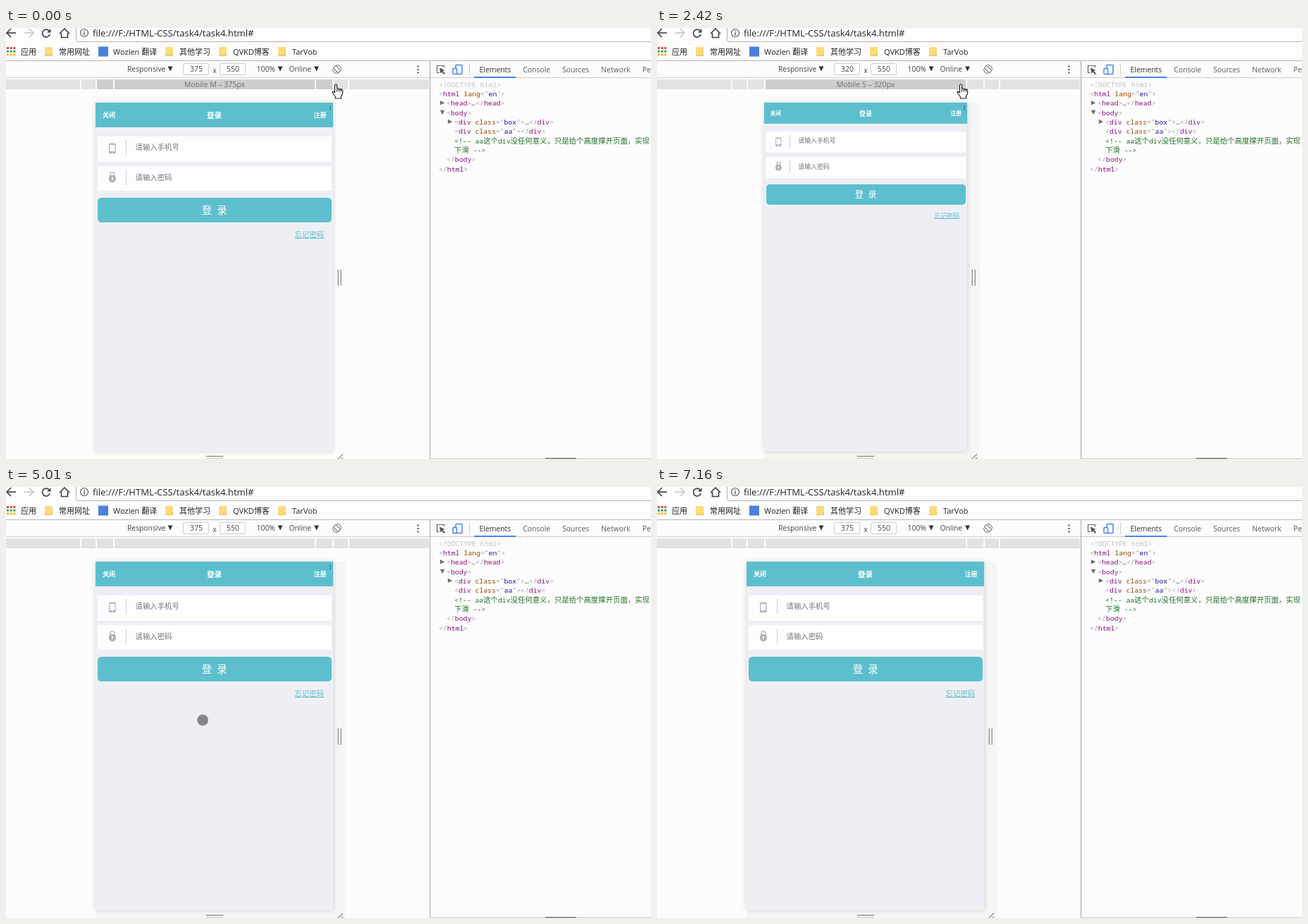
Write an HTML page with a canvas that moves like this. It is 915 by 612 pixels and loops after 7.72 s.

```html
<!DOCTYPE html>
<html lang="zh">
<head>
<meta charset="utf-8">
<title>Responsive login page</title>
<style>
html, body { margin: 0; width: 100%; height: 100%; overflow: hidden; background: #fcfcfc; }
canvas { display: block; }
</style>
</head>
<body>
<canvas id="stage" width="915" height="612"></canvas>
<script>
const ctx = document.getElementById('stage').getContext('2d');
const LOOP = 7720, STEP = 151, TOP = 106, PAGE_ZOOM = 0.9, DRAG = 151, EXIT = 6400;
const UI = '"Open Sans", "Noto Sans CJK SC", "Noto Sans CJK", sans-serif';
const CJK = '"Noto Sans CJK SC", "Noto Sans CJK", sans-serif';
const MONO = '"Noto Sans Mono", "Noto Sans CJK SC", monospace';
const TEAL = '#5dbfce', GREY = '#b0b0b0', PAPER = '#fcfcfc';
const PRESETS = [[320, 'Mobile S'], [375, 'Mobile M'], [425, 'Mobile L'], [768, 'Tablet'], [1024, 'Laptop']];

// ---- motion ----

function ramp(t, a, b) {
  const p = Math.min(1, Math.max(0, (t - a) / (b - a)));
  return p * p * (3 - 2 * p);
}

// Clicks on the preset bar
const widthAt = t => t < 540 ? 375 : t < 1360 ? 425 : t < 2300 ? 768 : t < 2720 ? 320 : 375;

// Two swipes up and back down; 1 is fully scrolled
const scrollAt = t => ramp(t, 3360, 3780) - ramp(t, 4440, 4980) + ramp(t, 5010, 5500) - ramp(t, 5800, 6030);

function pointerAt(t) {
  const lift = scrollAt(t) - ramp(t, 3780, 3900) + ramp(t, 4040, 4290);
  const x = 468 + 6 * ramp(t, 0, 260) + 29 * ramp(t, 540, 950) - 54 * ramp(t, 1100, 1350)
    - 44 * ramp(t, 1360, 2000) + 26 * ramp(t, 2270, 2410) + 18 * ramp(t, 2416, 2560)
    - 173 * ramp(t, 2720, 3200) + 6 * ramp(t, 3900, 6030) + 508 * ramp(t, EXIT, 7050);
  const y = 80 + 4 * Math.max(0, 1 - Math.abs(t - 1360) / 200) + 254 * ramp(t, 2720, 3200)
    - DRAG * lift - 3 * ramp(t, 4400, 4900) + 306 * ramp(t, EXIT, 7050);
  return [x, y];
}

// ---- drawing helpers ----

function rect(x, y, w, h, color) {
  ctx.fillStyle = color;
  ctx.fillRect(x, y, w, h);
}

function paint(fill, stroke) {
  if (fill) { ctx.fillStyle = fill; ctx.fill(); }
  if (stroke) { ctx.strokeStyle = stroke; ctx.stroke(); }
}

function box(x, y, w, h, r, fill, stroke) {
  ctx.beginPath();
  ctx.roundRect(x, y, w, h, r);
  paint(fill, stroke);
}

function poly(points, fill, stroke) {
  ctx.beginPath();
  points.forEach(([x, y]) => ctx.lineTo(x, y));
  if (fill) ctx.closePath();
  paint(fill, stroke);
}

function arc(x, y, r, fill, stroke, from = 0, to = Math.PI * 2) {
  ctx.beginPath();
  ctx.arc(x, y, r, from, to);
  paint(fill, stroke);
}

// y is the optical middle of the line; returns the right end
function text(s, x, y, size, color, align = 'left', font = UI, weight = 400) {
  ctx.font = `${weight} ${size}px ${font}`;
  ctx.textAlign = align;
  ctx.fillStyle = color;
  ctx.fillText(s, x, y + size * 0.37);
  return x + ctx.measureText(s).width;
}

// Triangle pointing right, or down when turned
function caret(x, y, size, color, turn) {
  ctx.save();
  ctx.translate(x, y);
  if (turn) ctx.rotate(Math.PI / 2);
  poly([[-size, -size], [size, 0], [-size, size]], color);
  ctx.restore();
}

// ---- browser window ----

function folder(x) {
  box(x, 27, 11, 13, 1, '#fbdc7c');
  rect(x, 38.5, 11, 1.5, '#eec75d');
  rect(x + 9, 35, 2, 5, '#f0cb63');
}

function browserBar() {
  rect(0, 0, 915, 46, '#fdfdfd');
  ctx.lineWidth = 1.7;
  for (const [x, dir, c] of [[1, 1, '#444'], [39, -1, '#c8c8c8']]) {
    poly([[x, 7], [x + 13 * dir, 7]], null, c);
    poly([[x + 6 * dir, 1], [x, 7], [x + 6 * dir, 13]], null, c);
  }
  arc(57, 7.5, 5.4, null, '#444', 0.3, 5.5);
  poly([[63.5, 1], [63.5, 6.5], [58, 6.5]], '#444');
  poly([[76, 8], [83, 1], [90, 8]], null, '#444');
  poly([[78.5, 7], [78.5, 13.5], [87.5, 13.5], [87.5, 7]], null, '#444');
  ctx.lineWidth = 1;
  poly([[99.5, 0], [99.5, 17], [101, 19.5], [915, 19.5]], null, '#b4b4b4');
  ctx.lineWidth = 1.2;
  arc(111, 7, 5.5, null, '#555');
  rect(110.3, 6, 1.4, 4.5, '#555');
  rect(110.3, 3.6, 1.4, 1.4, '#555');
  text('file:///F:/HTML-CSS/task4/task4.html#', 123, 7, 13.1, '#222');

  const hues = ['#e2493b', '#3f9d57', '#f0b72f'];
  for (let i = 0; i < 9; i++) rect(1 + (i % 3) * 4.7, 27 + Math.floor(i / 3) * 4.7, 3, 3, hues[Math.floor(i / 3)]);
  let x = text('应用', 21, 33.5, 11, '#222') + 12;
  ['常用网址', 'Wozlen 翻译', '其他学习', 'QVKD博客', 'TarVob'].forEach((name, i) => {
    if (i === 1) rect(x, 26.5, 14, 14, '#4a80dc');
    else folder(Math.round(x));
    x = text(name, Math.round(x) + (i === 1 ? 21 : 20), 33.5, 11, '#222') + 12;
  });
  rect(0, 46, 915, 1, '#b6b6b6');
}

function deviceToolbar(width, zoom) {
  const dx = zoom < 1 ? -6 : 0;
  text('Responsive', 172, 58.5, 10.3, '#444');
  text('x', 296, 60, 10.5, '#444', 'center');
  text(Math.round(zoom * 100) + '%', 355.5, 58.5, 10.4, '#444');
  text('Online', 401.5 + dx, 58.5, 10.3, '#444');
  for (const x of [233, 389 + dx, 440.5 + dx]) caret(x, 58, 3.4, '#333', true);
  ctx.lineWidth = 1;
  for (const [x, s] of [[251.5, width], [303.5, 550]]) {
    box(x, 50.5, 36, 16, 1, '#fff', '#cdcdcd');
    text(s, x + 18.5, 58.5, 10.4, '#444', 'center');
  }
  ctx.save();
  ctx.translate(469.5 + dx, 58.5);
  ctx.rotate(-Math.PI / 4);
  box(-2.5, -5, 5, 10, 1, null, '#666');
  arc(0, 0, 6, null, '#777', -0.9, 0.9);
  arc(0, 0, 6, null, '#777', 2.2, 4);
  ctx.restore();
  for (const d of [-4.5, 0, 4.5]) arc(584.5, 59 + d, 1.3, '#666');
  rect(0, 70, 601, 1, '#d2d2d2');
}

function presetBar(scale, px, py) {
  const mid = 296, edge = w => mid + w * scale / 2;
  rect(0, 73, 600, 14, '#e2e2e2');
  const hit = py < 83 && PRESETS.find(([w]) => edge(w) > px - 4);
  if (hit) {
    const right = Math.min(600, edge(hit[0]) - 1), left = Math.max(0, 2 * mid - right);
    rect(left, 73, right - left, 14, '#cdcdcd');
  }
  for (const [w] of PRESETS) {
    rect(Math.round(2 * mid - edge(w)), 73, 2, 14, '#fbfbfb');
    if (edge(w) < 600) rect(Math.round(edge(w)) - 2, 73, 2, 14, '#fbfbfb');
  }
  if (hit) text(`${hit[1]} – ${hit[0]}px`, mid, 80, 10.5, '#707070', 'center');
}

// ---- inspector ----

function code(s, x, y) {
  let prev = '';
  for (const tok of s.match(/<\/?|>|="|"|…|[a-z]+|\s+/g)) {
    let color = '#a894a6';
    if (tok === '…') color = '#444';
    else if (/[a-z]/.test(tok)) color = prev[0] === '<' ? '#881280' : prev === '="' ? '#1a1aa6' : '#994500';
    x = text(tok, x, y, 9.8, color, 'left', MONO);
    prev = tok;
  }
}

function comment(s, x, y) {
  for (const part of s.match(/[ -~]+|[^ -~]+/g)) {
    const wide = part.charCodeAt(0) > 255;
    x = text(part, x, y, wide ? 10.4 : 9.8, '#236e25', 'left', wide ? CJK : MONO);
  }
}

const SOURCE = `<!DOCTYPE html>
<html lang="en">
 <head>…</head>
 <body>
  <div class="box">…</div>
  <div class="aa"></div>
  <!-- aa这个div没任何意义，只是给个高度撑开页面，实现
  下滑 -->
 </body>
</html>`.split('\n');

function inspector() {
  rect(601, 47, 314, 565, PAPER);
  rect(601, 47, 1, 565, '#a8a8a8');
  ctx.lineWidth = 1.2;
  poly([[621.5, 56], [621.5, 53.5], [611.5, 53.5], [611.5, 63.5], [615, 63.5]], null, '#666');
  poly([[615, 56.5], [622.5, 60], [619.5, 61], [623, 64.5], [621.5, 66], [618, 62.5], [616.5, 65]], '#555');
  ctx.lineWidth = 1.5;
  box(638, 52.5, 9, 13, 1, null, '#4285f4');
  box(634, 57.5, 5.5, 8, 1, PAPER, '#4285f4');
  rect(657, 51, 1, 16, '#ccc');
  let tab = 671.5;
  for (const name of ['Elements', 'Console', 'Sources', 'Network', 'Performance']) {
    tab = text(name, tab, 59, 10.4, name === 'Elements' ? '#333' : '#5a5a5a') + 17;
  }
  rect(602, 70, 313, 1, '#ccc');
  rect(664, 69, 59, 2, '#4285f4');

  SOURCE.forEach((line, i) => {
    const s = line.trim(), x = 614 + 11 * (line.length - s.length), y = 80 + i * 13.35;
    if (s.startsWith('<!D')) text(s, x, y, 9.8, '#c0c0c0', 'left', MONO);
    else if (s.includes('--')) comment(s, x, y);
    else code(s, x, y);
    if (s.includes('…')) caret(x - 6, y - 0.5, 3.2, '#6e6e6e');
    if (s === '<body>') caret(x - 6, y, 3.2, '#6e6e6e', true);
  });
  rect(602, 611, 313, 1, '#ccc');
  rect(765, 610.5, 44, 1.5, '#777');
}

// ---- emulated page, laid out on a 337 px wide screen ----

function loginPage(x0, w, scroll, thumb) {
  const u = w / 337;
  const X = x => x0 + x * u, Y = y => TOP + y * u;
  const label = (s, x, y, size, color, align, weight) => text(s, X(x), Y(y), size * u, color, align, CJK, weight);
  const block = (x, y, bw, bh, color, r = 0) => {
    const l = Math.round(X(x)), t = Math.round(Y(y));
    box(l, t, Math.round(X(x + bw)) - l, Math.round(Y(y + bh)) - t, r * u, color);
  };

  ctx.save();
  ctx.translate(0, -scroll);
  ['请输入手机号', '请输入密码'].forEach((hint, i) => {
    const mid = 63.3 + i * 42.8;
    block(3, mid - 15.8, 332, 36 - i, '#fdfdfd');
    rect(Math.round(X(42.6)), Y(mid - 10.5), 1, 21.6 * u, '#cfcfcf');
    label(hint, 56.5, mid, 10.4, '#757575');
  });
  box(X(19), Y(57.8), 9.6 * u, 14.4 * u, 1.5 * u, GREY);
  rect(X(20.2), Y(59.8), 7.2 * u, 9.4 * u, '#fdfdfd');
  arc(X(23.8), Y(70.7), 0.8 * u, '#fdfdfd');
  ctx.lineWidth = 1.3 * u;
  ctx.beginPath();
  ctx.moveTo(X(21), Y(106));
  ctx.arc(X(23.9), Y(101.8), 2.9 * u, Math.PI, 0);
  ctx.lineTo(X(26.8), Y(106));
  paint(null, GREY);
  arc(X(23.9), Y(108), 5.2 * u, GREY);
  arc(X(23.9), Y(107), 1.3 * u, '#fdfdfd');
  rect(X(23.4), Y(107.2), u, 3.6 * u, '#fdfdfd');

  block(3, 135.4, 331.5, 34.4, TEAL, 5.5);
  label('登', 158, 152.7, 14.5, '#fff', 'center');
  label('录', 179.6, 152.7, 14.5, '#fff', 'center');
  label('忘记密码', 282.6, 187.5, 10.4, TEAL);
  rect(X(282.6), Math.round(Y(192)), 41.6 * u, Math.max(1, 0.9 * u), TEAL);
  ctx.restore();

  block(0, 0, 337, 35, TEAL);
  const weight = u > 1.4 ? 400 : 700;
  label('关闭', 9.9, 17.9, 9, '#fff', 'left', weight);
  label('登录', 168.6, 17.9, 10.6, '#fff', 'center', weight);
  label('注册', 327.6, 17.9, 9, '#fff', 'right', weight);
  if (thumb) rect(x0 + w - 5, TOP + 4, 2, u > 1.4 ? 2 : 7, 'rgba(40,90,100,.45)');
}

function device(width, scale, scroll, t) {
  const w = Math.floor(width * scale), h = Math.round(550 * scale);
  const x = Math.round(295.5 - w / 2), right = x + w, bottom = TOP + h;
  if (t >= 540) {
    rect(right, TOP, 18, h + 17, '#f5f5f5');
    rect(x, bottom, w, 17, '#f5f5f5');
  }
  ctx.save();
  ctx.shadowColor = 'rgba(0,0,0,.16)';
  ctx.shadowBlur = 7;
  rect(x, TOP, w, h, '#eeeff4');
  ctx.restore();
  ctx.save();
  ctx.beginPath();
  ctx.rect(x, TOP, w, h);
  ctx.clip();
  loginPage(x, w, scroll, t < EXIT);
  ctx.restore();

  const mid = Math.round(TOP + h / 2);
  for (const d of [7, 11]) {
    rect(right + d - 0.5, mid - 11, 1.5, 23, '#999');
    rect(284, bottom + d - 0.5, 24, 1.5, '#999');
  }
  ctx.lineWidth = 1.4;
  for (const d of [4, 9]) poly([[right + d, bottom + 14], [right + 14, bottom + d]], null, '#999');
  return px => px > x && px < right;
}

// ---- pointers ----

function hand(x, y) {
  ctx.save();
  ctx.translate(x, y);
  ctx.lineWidth = 1.2;
  ctx.lineJoin = 'round';
  ctx.beginPath();
  ctx.moveTo(-1.5, 12);
  ctx.lineTo(-1.5, 1);
  ctx.quadraticCurveTo(0, -1.5, 1.5, 1);
  ctx.lineTo(1.5, 6);
  for (const k of [4.5, 7.2, 9.5]) ctx.quadraticCurveTo(k - 1, 4.5 + k * 0.15, k, 7 + k * 0.1);
  [[9.5, 13], [7.5, 17], [7.5, 20], [-0.5, 20], [-0.5, 18], [-5, 11.5]].forEach(p => ctx.lineTo(...p));
  ctx.quadraticCurveTo(-4.5, 8.5, -1.5, 12);
  paint('#fff', '#222');
  for (const k of [1.5, 4.5, 7.2]) poly([[k, 7], [k, 10.5]], null, '#222');
  ctx.restore();
}

function arrow(x, y) {
  ctx.lineWidth = 1;
  const shape = [[0, 0], [0, 16], [3.7, 12.5], [6.5, 18.5], [9, 17.4], [6.2, 11.6], [11.3, 11.3], [0, 0]];
  poly(shape.map(([a, b]) => [x + a, y + b]), '#fff', '#222');
}

function draw(now) {
  const t = now % LOOP, shot = Math.floor(t / STEP) * STEP;
  const width = widthAt(t), zoom = width > 600 ? 0.83 : 1, scale = PAGE_ZOOM * zoom;
  const [px, py] = pointerAt(shot);
  rect(0, 0, 915, 612, PAPER);
  browserBar();
  deviceToolbar(width, zoom);
  presetBar(scale, px, py);
  const inside = device(width, scale, Math.round(DRAG * scrollAt(shot)), t);
  inspector();
  if (py < TOP - 5) hand(px, py);
  else if (inside(px)) {
    ctx.lineWidth = 1;
    arc(px, py, 8.4, '#868686', '#f6f6f6');
  } else arrow(px, py);
}

const start = performance.now();
(function tick() {
  draw(performance.now() - start);
  requestAnimationFrame(tick);
})();
</script>
</body>
</html>
```
